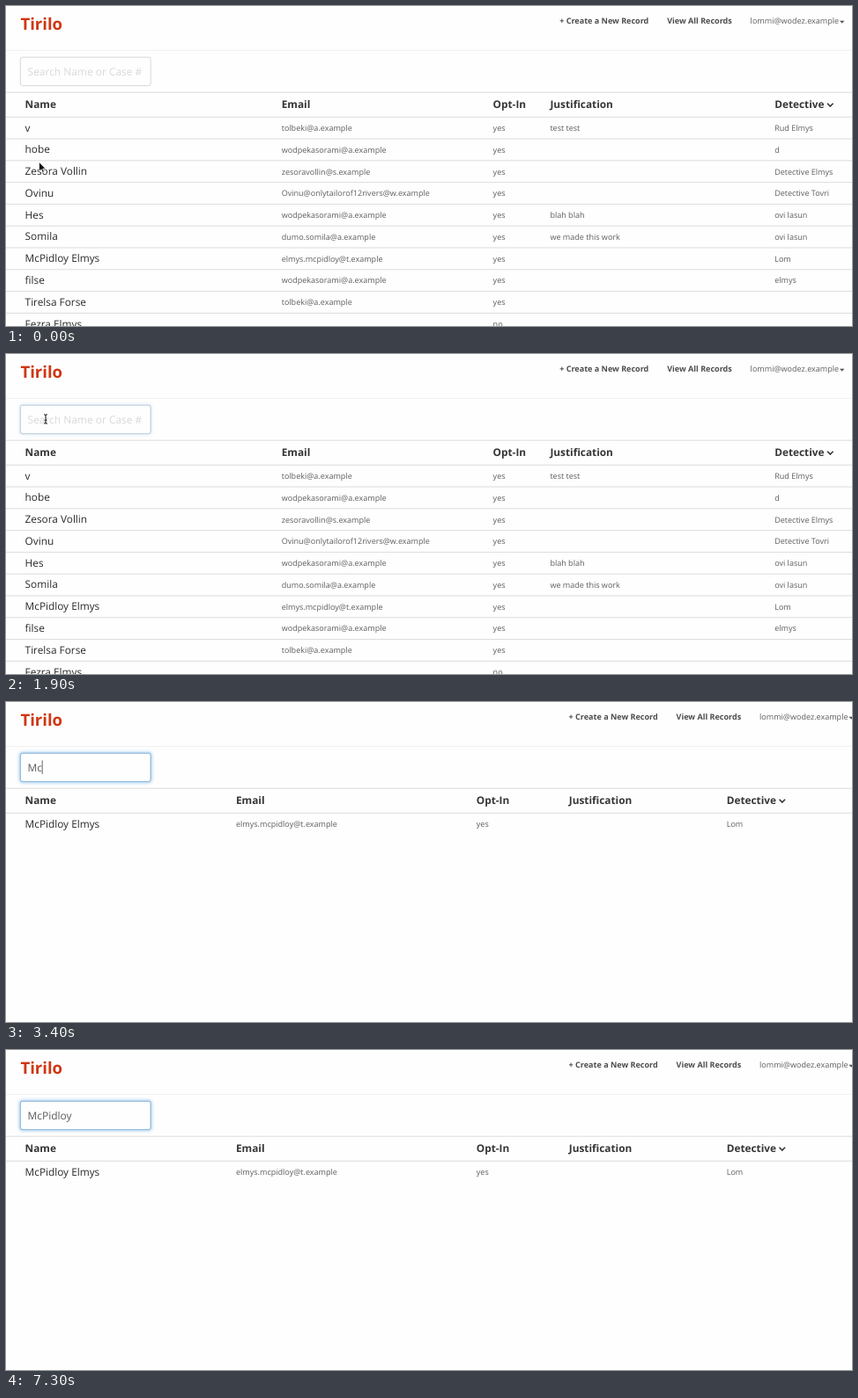
Animation of 960 by 364 pixels, one loop 7400 ms. Source, as an HTML page:

```html
<!DOCTYPE html>
<html lang="en">
<head>
<meta charset="utf-8">
<title>Record search</title>
<style>
html, body { margin: 0; width: 100%; height: 100%; overflow: hidden; background: #fefefe; }
svg { display: block; width: 960px; height: 364px; }
text { font: 9.04px "Open Sans", sans-serif; fill: #5e5e5e; text-rendering: geometricPrecision; white-space: pre; }
.name { font-size: 11.82px; fill: #2a2a2a; }
.head { font-size: 11.82px; font-weight: 700; fill: #363636; }
.nav { font-weight: 700; fill: #4c4c4c; }
.brand { font-size: 18.6px; font-weight: 700; fill: #cf3612; }
.field { font-size: 11.95px; fill: #5a5a5a; }
.hint { font-size: 11.95px; fill: #d8d8d8; }
</style>
</head>
<body>
<svg viewBox="0 0 960 364">
  <defs>
    <filter id="blur" x="-20%" y="-50%" width="140%" height="200%"><feGaussianBlur stdDeviation="1.5"/></filter>
  </defs>
  <text class="brand" x="16.4" y="27.2">Tirilo</text>
  <path d="M0 50.5H960" stroke="#f1f1f1"/>
  <g id="nav">
    <text class="nav" x="628.2" y="20.4">+ Create a New Record</text>
    <text class="nav" x="750.2" y="20.4">View All Records</text>
    <text x="844.6" y="20.4">lommi@wodez.example</text>
    <path d="M946 16.8h5.4l-2.7 3z" fill="#555"/>
  </g>
  <g id="table"></g>
  <rect id="glow" x="15.7" y="57.7" width="149.1" height="33.6" rx="3" fill="none" stroke="#66afe9" stroke-width="2.4" filter="url(#blur)"/>
  <rect x="16.3" y="58.2" width="147.9" height="32.5" rx="2.5" fill="#fefefe" stroke="#d8d8d8"/>
  <rect id="ring" x="16.3" y="58.2" width="147.9" height="32.5" rx="2.5" fill="none" stroke="#80b4e0"/>
  <text id="field" x="24.6" y="78.5"></text>
  <rect id="caret" y="66.5" width="1" height="15.5" fill="#666"/>
  <path id="arrow" d="M0 0V10.6L2.5 8.3L4.1 12L5.8 11.3L4.2 7.7H7.5Z" fill="#111" stroke="#fff" stroke-width=".7"/>
  <path id="beam" d="M-2 -5.2Q0 -5.2 0 -4V4Q0 5.2 -2 5.2M2 -5.2Q0 -5.2 0 -4M0 4Q0 5.2 2 5.2M-1.3 1.2H1.3" fill="none" stroke="#222" stroke-width="1.1"/>
</svg>
<script>
const LOOP = 7400, STEP = 100;
const $ = id => document.getElementById(id);
const clamp = v => Math.max(0, Math.min(1, v));

// name | email | opt-in | justification | detective
const rows = `v|tolbeki@a.example|yes|test test|Rud Elmys
hobe|wodpekasorami@a.example|yes||d
Zesora Vollin|zesoravollin@s.example|yes||Detective Elmys
Ovinu|Ovinu@onlytailorof12rivers@w.example|yes||Detective Tovri
Hes|wodpekasorami@a.example|yes|blah blah|ovi lasun
Somila|dumo.somila@a.example|yes|we made this work|ovi lasun
McPidloy Elmys|elmys.mcpidloy@t.example|yes||Lom
filse|wodpekasorami@a.example|yes||elmys
Tirelsa Forse|tolbeki@a.example|yes||
Fezra Elmys||no||`.split('\n').map(r => r.split('|'));
const heads = ['Name', 'Email', 'Opt-In', 'Justification', 'Detective'];

// column positions before typing, after one letter, after two
const layouts = [
  [21.6, 312.7, 552.6, 617.4, 872.2],
  [21.6, 190.7, 474.6, 551, 853.7],
  [21.6, 261, 533.8, 638.8, 817.7]
];
const TOP = 126.3, PITCH = 24.78;

// time of each keystroke
const keys = [3300, 3400, 4100, 4300, 4800, 5200, 5400, 5600];
const query = 'McPidloy';
const CLICK = 1900, FOCUS = 2100, HIDE = 2600;

const label = (x, y, s, cls) => `<text class="${cls}" x="${x}" y="${y}">${s}</text>`;
const line = y => `<path d="M0 ${y}H960" stroke="#dcdcdc"/>`;

function drawTable(mode) {
  const xs = layouts[mode], d = xs[4] + 59.8;
  const shown = mode == 2 ? rows.filter(r => r[0].startsWith('Mc')) : rows;
  let out = line(98.2) + heads.map((h, i) => label(xs[i], 116.1, h, 'head')).join('') +
    `<path d="M${d} 110.8l3.3 3.3l3.3 -3.3" fill="none" stroke="#333" stroke-width="1.5"/>`;
  shown.forEach((r, k) => {
    const y = TOP + k * PITCH;
    out += line(y) +
      r.map((s, i) => label(xs[i], y + (i ? 15.7 : 16.2), s, i ? '' : 'name')).join('');
  });
  $('table').innerHTML = out;
  $('nav').setAttribute('transform', `translate(${mode == 2 ? 10.4 : 0} 0)`);
}

function drawPointer(t) {
  const p = clamp(t / 1000), e = p * p * (3 - 2 * p);
  const x = 37.5 + 7.5 * e, y = 177.5 - 103.5 * e;
  const inField = y < 91;
  $('arrow').style.display = inField ? 'none' : '';
  $('beam').style.display = inField && t < HIDE ? '' : 'none';
  for (const id of ['arrow', 'beam']) $(id).setAttribute('transform', `translate(${x} ${y})`);
}

function drawField(t, typed) {
  const f = $('field');
  f.textContent = typed ? query.slice(0, typed) : 'Search Name or Case #';
  f.setAttribute('class', typed ? 'field' : 'hint');
  const focus = clamp((t - CLICK + STEP) / 300);
  $('glow').style.opacity = focus * .5;
  $('ring').style.opacity = focus;
  // the blink restarts with every key
  const since = t - (typed ? keys[typed - 1] : FOCUS);
  $('caret').style.display = since >= 0 && since % 1000 < 500 ? '' : 'none';
  $('caret').setAttribute('x', 24.2 + (typed ? f.getComputedTextLength() : 0));
}

let mode = -1;
function frame() {
  const now = performance.now() % LOOP, t = now - now % STEP;
  const typed = keys.filter(k => k <= t).length;
  const next = Math.min(typed, 2);
  if (next != mode) drawTable(mode = next);
  drawPointer(t);
  drawField(t, typed);
  requestAnimationFrame(frame);
}
frame();
</script>
</body>
</html>
```
